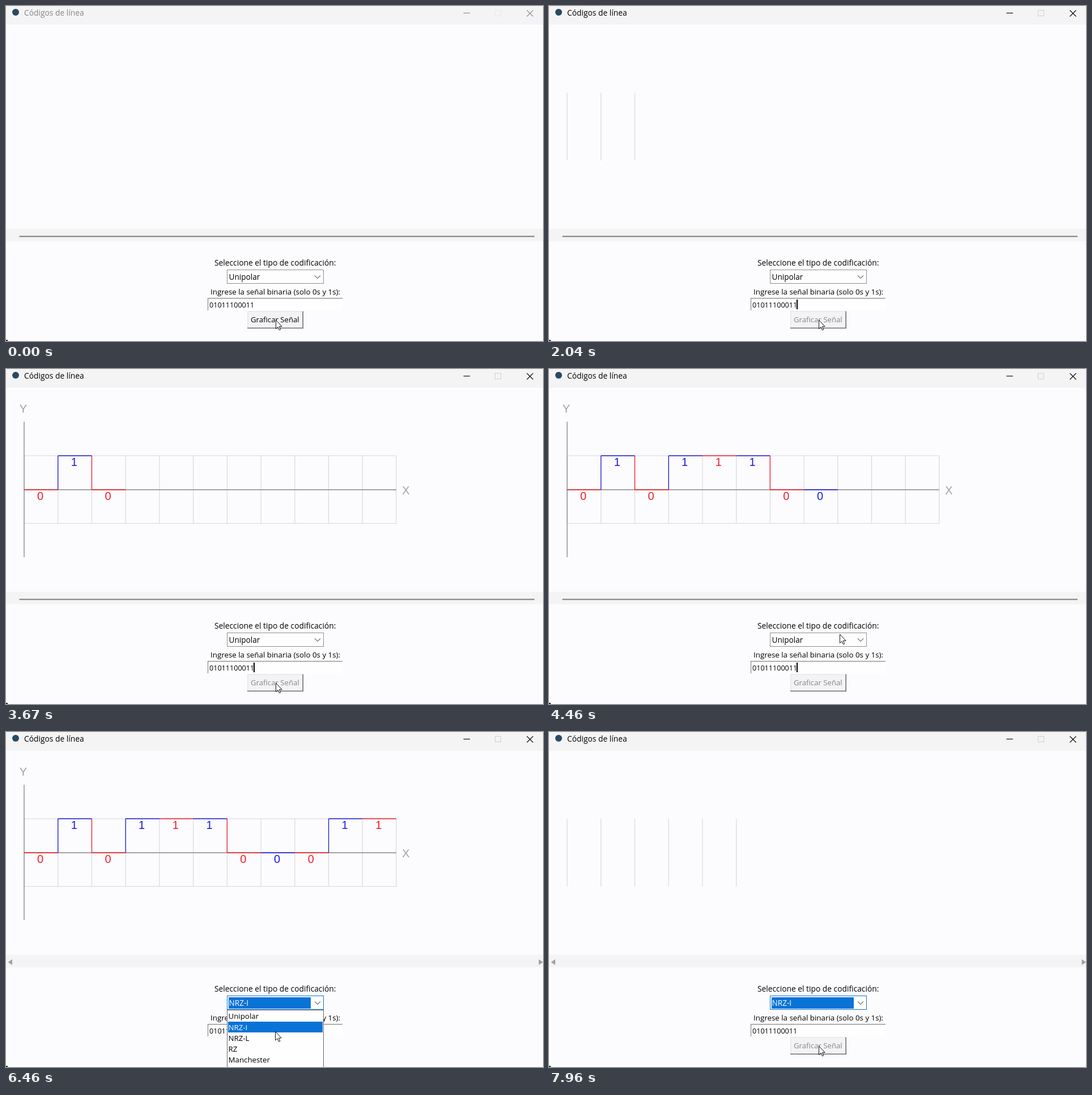
Recreate the animation shown at these times as an HTML page with a canvas. Size 948 by 591 pixels, loop 8 s.

```html
<!DOCTYPE html>
<html lang="es">
<head>
<meta charset="utf-8">
<title>Códigos de línea</title>
<style>
  html, body { margin: 0; width: 100%; height: 100%; overflow: hidden; background: #fcfcfe; }
  canvas { display: block; }
</style>
</head>
<body>
<canvas id="stage" width="948" height="591"></canvas>
<script>
const ctx = document.getElementById('stage').getContext('2d');
const LOOP = 8000;
const UI = '"Open Sans", "Noto Sans", sans-serif';
const PLOT = '"Liberation Sans", Arial, sans-serif';
const PAPER = '#fcfcfe', CHROME = '#f4f4f5', INK = '#000', FADED = '#868686', ACCENT = '#0a73d6';
const BITS = '01011100011';
const CODES = ['Unipolar', 'NRZ-I', 'NRZ-L', 'RZ', 'Manchester'];

// Moments of the session, in ms
const PRESS = 1580, RELEASE = 1790, GRID = 1860, AXES = 2842, SIGNAL = 3080, READY = 4984;
const OPEN = 5460, HOVER_NEXT = 5780, PICK = 6460, CLOSE = 6630;
const PRESS_2 = 7460, RELEASE_2 = 7580, GRID_2 = 7645;
const GRID_STEP = 62, DRAW_STEP = 119;

// Plot geometry
const LEFT = 32, RIGHT = 689, TOP = 153, MID = 213, BOTTOM = 272.5;
const CELL = (RIGHT - LEFT) / BITS.length;

// Pointer path: time, x, y
const POINTER = [
  [0, 476.5, 554], [3950, 476.5, 554], [4300, 513.5, 468], [4900, 513.5, 468], [5030, 513.5, 473],
  [5460, 513.5, 473], [6000, 475.5, 523], [6280, 475.5, 523], [6290, 475.5, 528.5], [6630, 475.5, 528.5],
  [7040, 475, 548], [7200, 475, 548], [7290, 476.5, 554], [LOOP, 476.5, 554]
];

function rect(x, y, w, h, fill, stroke) {
  if (fill) { ctx.fillStyle = fill; ctx.fillRect(x, y, w, h); }
  if (stroke) {
    ctx.strokeStyle = stroke;
    ctx.lineWidth = 1;
    ctx.strokeRect(x + .5, y + .5, w - 1, h - 1);
  }
}

function path(color, width, ...points) {
  ctx.strokeStyle = color;
  ctx.lineWidth = width;
  ctx.beginPath();
  points.forEach(([x, y]) => ctx.lineTo(x, y));
  ctx.stroke();
}

function shape(fill, ...points) {
  ctx.fillStyle = fill;
  ctx.beginPath();
  points.forEach(([x, y]) => ctx.lineTo(x, y));
  ctx.closePath();
  ctx.fill();
}

function text(str, x, y, size, color = INK, family = UI, align = 'left') {
  ctx.font = `${size}px ${family}`;
  ctx.textAlign = align;
  ctx.fillStyle = color;
  ctx.fillText(str, x, y);
}

function drawTitleBar(active) {
  const ink = active ? '#111' : '#909090';
  rect(0, 0, 948, 33, CHROME);
  ctx.fillStyle = '#294a63';
  ctx.beginPath();
  ctx.arc(17, 11, 6, 0, 7);
  ctx.fill();
  text('Códigos de línea', 32, 17, 13.8, active ? INK : FADED);
  path(ink, 1.2, [807.5, 12.5], [819, 12.5]);
  rect(863, 7, 11, 11, null, active ? '#d0d0c8' : '#e8e8ea');
  path(ink, 1.2, [919.5, 7.5], [930.5, 18.5]);
  path(ink, 1.2, [930.5, 7.5], [919.5, 18.5]);
}

function drawScrollbar(arrows) {
  rect(0, 393, 948, 22, CHROME);
  if (arrows) {
    shape('#a0a0a0', [3.5, 406], [11, 401], [11, 411]);
    shape('#a0a0a0', [948, 406], [940.5, 401], [940.5, 411]);
  } else {
    path('#7c7c7c', 2, [23.5, 406.4], [933, 406.4]);
  }
}

function drawGrid(elapsed) {
  const count = Math.floor(elapsed / GRID_STEP) + 1;
  for (let i = 0; i < Math.min(count, BITS.length + 1); i++) {
    const x = LEFT + i * CELL;
    path('#d9d9de', 1.2, [x, TOP], [x, BOTTOM]);
  }
  [TOP, MID, BOTTOM].slice(0, Math.max(0, count - BITS.length - 1))
    .forEach(y => path('#d5d5e6', 1.2, [LEFT, y], [RIGHT, y]));
}

function drawAxes(elapsed) {
  if (elapsed < 0) return;
  path('#8c8c8c', 1.4, [LEFT, MID], [RIGHT, MID]);
  text('X', 706, 221, 20, '#a0a0a8', PLOT, 'center');
  if (elapsed < DRAW_STEP) return;
  path('#8c8c8c', 1.4, [LEFT, 93], [LEFT, 332]);
  text('Y', 30.5, 77, 20, '#a0a0a0', PLOT, 'center');
}

// A level change takes one step for its edge, each bit one more for its line and digit.
function drawSignal(elapsed) {
  let steps = Math.floor(elapsed / DRAW_STEP) + 1;
  const level = bit => bit === '1' ? TOP : MID;
  for (let i = 0; i < BITS.length; i++) {
    const x = LEFT + i * CELL, y = level(BITS[i]);
    const before = i ? level(BITS[i - 1]) : y;
    const color = i % 2 ? '#1a1ad6' : '#ee1c24';
    if (before !== y) {
      if (steps-- <= 0) return;
      path(color, 1.3, [x, before], [x, y]);
    }
    if (steps-- <= 0) return;
    path(color, 1.4, [x, y], [x + CELL, y]);
    text(BITS[i], x + 28.5, y + 18, 20, color, PLOT, 'center');
  }
}

function drawPlot(t) {
  if (t >= GRID_2) {
    drawGrid(t - GRID_2);
  } else if (t >= GRID && t < RELEASE_2) {
    drawGrid(t - GRID);
    drawAxes(t - AXES);
    drawSignal(t - SIGNAL);
  }
}

function drawCombo(t) {
  const picked = t >= PICK;
  rect(390, 465, 171, 25, '#fefefe', picked ? ACCENT : '#8f8f8f');
  if (picked) rect(393, 468, 145, 20, ACCENT);
  if (t >= OPEN && t < HOVER_NEXT) rect(540, 465, 21, 25, '#cfe6f8', '#3c8fd0');
  text(CODES[picked ? 1 : 0], 393.5, 483, 13.6, picked ? '#fff' : INK);
  path('#777', 1.2, [545, 475.5], [550, 480.5], [555, 475.5]);
}

function drawEntry(t) {
  rect(356, 515, 238, 22, '#fefefe');
  path('#858585', 1.2, [356.5, 537], [356.5, 515.7], [594, 515.7]);
  text(BITS, 359, 531.5, 12.6);
  const caret = t >= PRESS && t < OPEN && (t - 1650) % 900 < 600;
  if (caret) rect(437, 518, 2, 17, '#000');
}

function drawButton(t) {
  const pressed = (t >= PRESS && t < RELEASE) || (t >= PRESS_2 && t < RELEASE_2);
  const disabled = (t >= RELEASE && t < READY) || t >= RELEASE_2;
  const dark = '#707070', light = '#e8e8ea', shift = pressed ? 1 : 0;
  rect(426, 538, 99, 31, '#f3f3f6');
  path(pressed ? dark : light, 1.6, [426.8, 568], [426.8, 538.8], [524, 538.8]);
  path(pressed ? light : dark, 1.6, [524.2, 538.5], [524.2, 568.2], [426, 568.2]);
  text('Graficar Señal', 432 + shift, 557.5 + shift, 13.2, disabled ? FADED : INK);
}

function drawList(t) {
  if (t < OPEN || t >= CLOSE) return;
  const selected = t < HOVER_NEXT ? 0 : 1;
  rect(390, 490, 171, 110, '#fefefe', '#666');
  CODES.forEach((name, i) => {
    const y = 492 + i * 19.2;
    if (i === selected) rect(392, Math.round(y), 167, 19, ACCENT);
    text(name, 392.5, y + 14.3, 13.3, i === selected ? '#fff' : INK);
  });
}

function pointerAt(t) {
  const next = POINTER.findIndex(key => key[0] > t);
  const [t0, x0, y0] = POINTER[next - 1], [t1, x1, y1] = POINTER[next];
  const p = (t - t0) / (t1 - t0), ease = p * p * (3 - 2 * p);
  return [x0 + (x1 - x0) * ease, y0 + (y1 - y0) * ease];
}

function drawPointer(t) {
  const [x, y] = pointerAt(t);
  const arrow = new Path2D('M0 0V15.5L3.6 12.3L6 17.8L8.3 16.8L5.9 11.4H10.6Z');
  ctx.save();
  ctx.translate(x, y);
  ctx.fillStyle = '#fff';
  ctx.fill(arrow);
  ctx.strokeStyle = '#111';
  ctx.lineWidth = 1;
  ctx.stroke(arrow);
  ctx.restore();
}

function draw(now) {
  const t = now % LOOP;
  rect(0, 0, 948, 591, PAPER);
  drawTitleBar(t >= PRESS);
  drawPlot(t);
  drawScrollbar(t >= READY);
  text('Seleccione el tipo de codificación:', 368, 458, 13.8);
  drawCombo(t);
  text('Ingrese la señal binaria (solo 0s y 1s):', 361, 508.5, 13.35);
  drawEntry(t);
  drawButton(t);
  drawList(t);
  rect(0, 589, 3, 2, '#222');
  drawPointer(t);
}

const start = performance.now();
function frame() {
  draw(performance.now() - start);
  requestAnimationFrame(frame);
}
frame();
</script>
</body>
</html>
```
